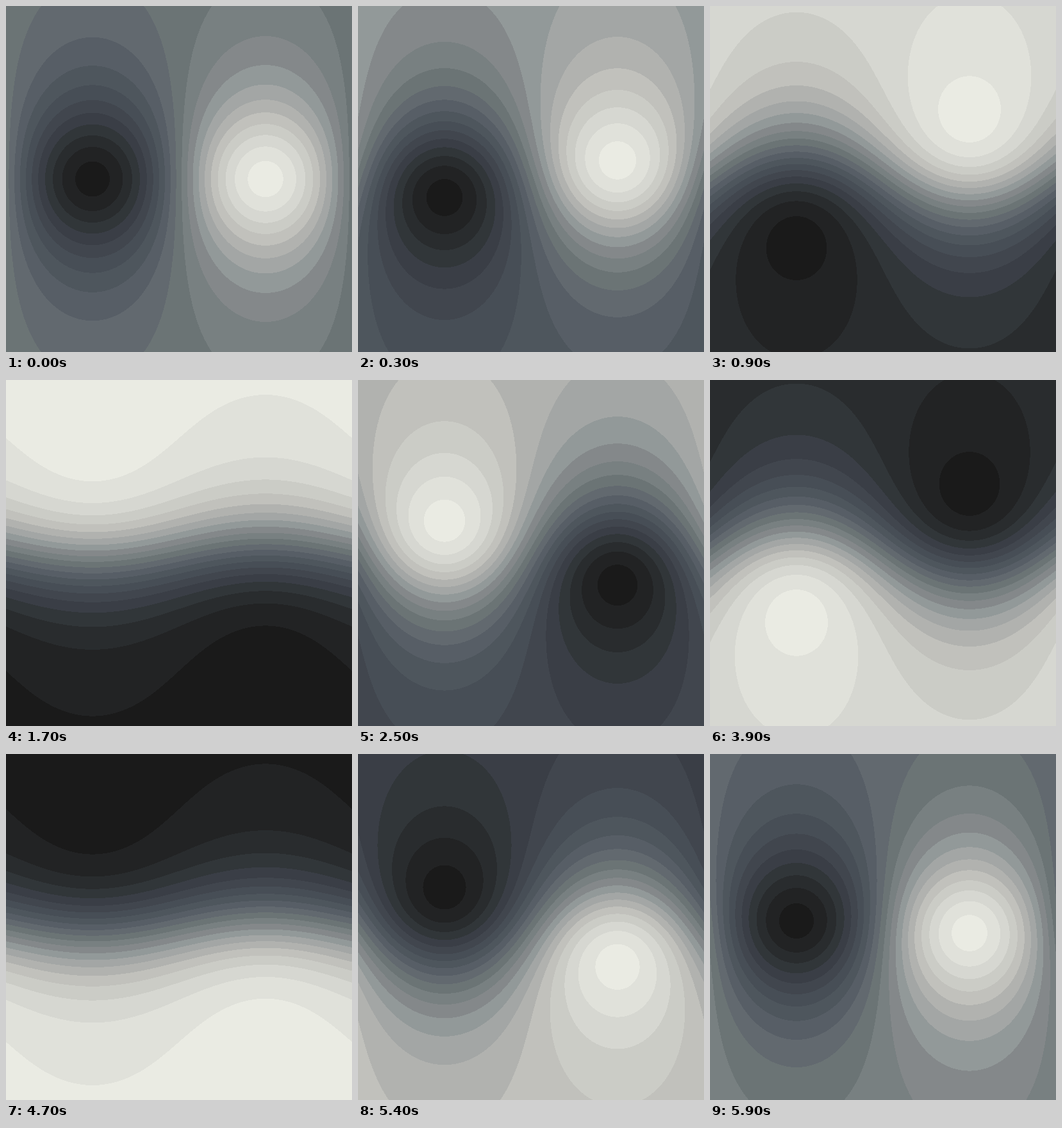
These frames come from a looping animation (540 by 540 pixels, 6000 ms). An HTML page with a canvas:

```html
<!DOCTYPE html>
<html lang="en">
<head>
<meta charset="utf-8">
<title>Banded sphere</title>
<style>
  html, body { margin: 0; width: 100%; height: 100%; overflow: hidden; background: #6b7475; }
  canvas { display: block; width: 540px; height: 540px; }
</style>
</head>
<body>
<canvas id="stage" width="540" height="540"></canvas>
<script>
const SIZE = 540;
const LOOP = 6000;
const STEP = 100;
const SCALE = 2 * Math.PI / SIZE;
const BIAS = 0.015;

// 21 tones from dark pole to light pole
const tones = ('1a1a1a 222324 292c2e 313639 3a3e46 41464e 474e56 4e565d 575e66 62696f 6b7475 ' +
  '788081 84888a 929999 a3a6a5 b1b2af c1c1bc cbccc6 d6d7d1 e0e1da eaebe3')
  .split(' ')
  .map(hex => {
    const n = parseInt(hex, 16);
    return (255 << 24 | (n & 255) << 16 | (n & 0xff00) | n >> 16) >>> 0;
  });

const ctx = document.getElementById('stage').getContext('2d');
const image = ctx.createImageData(SIZE, SIZE);
const pixels = new Uint32Array(image.data.buffer);

const axis = fn => Float64Array.from({ length: SIZE }, (_, i) => fn((i + 0.5) * SCALE));
const lonSin = axis(Math.sin);
const latCos = axis(a => 1 / Math.cosh(a - Math.PI));
const latSin = axis(a => Math.tanh(a - Math.PI));

// Mercator map of a sphere, shaded by its height along a turning axis
function draw(angle) {
  const c = Math.cos(angle), s = Math.sin(angle);
  for (let y = 0, p = 0; y < SIZE; y++) {
    const across = -c * latCos[y];
    const along = -s * latSin[y];
    for (let x = 0; x < SIZE; x++) {
      const level = Math.round(10 + BIAS + 10 * (across * lonSin[x] + along));
      pixels[p++] = tones[Math.max(0, Math.min(20, level))];
    }
  }
  ctx.putImageData(image, 0, 0);
}

const start = performance.now();
let shown = -1;

function tick() {
  const time = Math.max(0, performance.now() - start) % LOOP;
  const step = Math.floor(time / STEP);
  if (step !== shown) {
    shown = step;
    draw(2 * Math.PI * step * STEP / LOOP);
  }
  requestAnimationFrame(tick);
}
tick();
</script>
</body>
</html>
```
